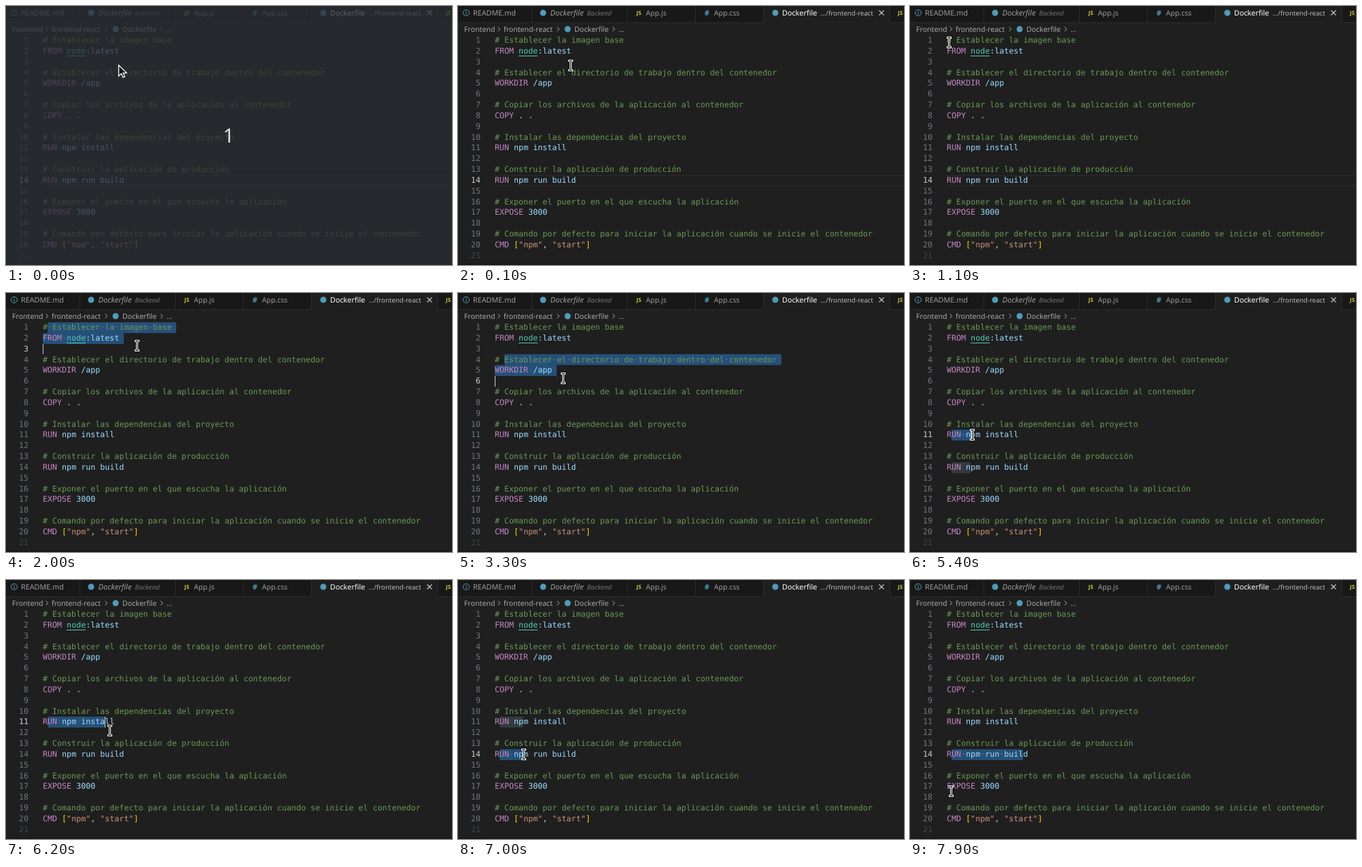
These frames come from a looping animation (655 by 381 pixels, 8 s). An HTML page with a canvas:

```html
<!DOCTYPE html>
<html lang="es">
<head>
<meta charset="utf-8">
<title>Dockerfile</title>
<style>
html, body { margin: 0; width: 100%; height: 100%; overflow: hidden; background: #1f1f1f; }
canvas { display: block; width: 655px; height: 381px; }
</style>
</head>
<body>
<canvas id="stage" width="655" height="381"></canvas>
<script>
const ctx = document.getElementById('stage').getContext('2d');
const W = 655, H = 381, LOOP = 8000, STEP = 100;
// Editor metrics at 5/6 zoom
const LEFT = 54, TOP = 42.9, CHAR = 7.024, ROW = 19 * 5 / 6;
const MONO = '11.667px "DejaVu Sans Mono", monospace';
const UI = '"Noto Sans", sans-serif';
const BLUE = '#519aba', YELLOW = '#cbcb41', DIM = '#9d9d9d';

const lines = `# Establecer la imagen base
FROM node:latest

# Establecer el directorio de trabajo dentro del contenedor
WORKDIR /app

# Copiar los archivos de la aplicación al contenedor
COPY . .

# Instalar las dependencias del proyecto
RUN npm install

# Construir la aplicación de producción
RUN npm run build

# Exponer el puerto en el que escucha la aplicación
EXPOSE 3000

# Comando por defecto para iniciar la aplicación cuando se inicie el contenedor
CMD ["npm", "start"]
`.split('\n');

// Pointer path: time, x, y
const path = [
  [400, 166, 88], [900, 54, 56], [1100, 58, 54], [1300, 58, 54], [1400, 61, 53],
  [1500, 76, 53], [1600, 100, 55], [1800, 175, 68], [2000, 193, 78], [2200, 150, 86],
  [2500, 68, 97], [2900, 140, 103], [3100, 152, 117], [3300, 155, 126], [3800, 54, 156],
  [3900, 55, 151], [4000, 55, 151], [4100, 62, 148], [4200, 90, 155], [4300, 117, 159],
  [4800, 62, 207], [5000, 62, 207], [5100, 63, 208], [5900, 139, 211], [6000, 146, 214],
  [6200, 153, 222], [6800, 61, 256], [6900, 62, 256], [7200, 166, 258], [7700, 89, 309],
  [7800, 72, 311], [7900, 61, 311]
];

// Mouse drags: press time, release time, anchor row and column
const drags = [
  { down: 1400, up: 2000, row: 0, col: 1 },
  { down: 2500, up: 3300, row: 3, col: 2 },
  { down: 4100, up: 4300, row: 6, col: 0 },
  { down: 5100, up: 6000, row: 10, col: 1 },
  { down: 6900, up: 7200, row: 13, col: 1 }
];

const colX = c => LEFT + c * CHAR;
const rowY = r => Math.round(TOP + r * ROW);
const baseline = r => Math.round(TOP + r * ROW + 11.2);

function pointer(t) {
  const i = path.findIndex(k => k[0] > t);
  if (i === 0) return path[0].slice(1);
  if (i < 0) return path[path.length - 1].slice(1);
  const [t0, x0, y0] = path[i - 1], [t1, x1, y1] = path[i];
  const p = (t - t0) / (t1 - t0);
  return [x0 + (x1 - x0) * p, y0 + (y1 - y0) * p];
}

function selection(t) {
  const drag = drags.filter(d => d.down <= t).pop();
  if (!drag) return null;
  const [x, y] = pointer(Math.min(t, drag.up));
  const row = Math.floor((y - TOP) / ROW);
  const col = Math.max(0, Math.min(lines[row].length, Math.round((x - LEFT) / CHAR)));
  return { r0: drag.row, c0: drag.col, r1: row, c1: col, caret: t < drag.up + 500 };
}

function text(str, x, y, color, font, align = 'left') {
  ctx.font = font;
  ctx.fillStyle = color;
  ctx.textAlign = align;
  ctx.fillText(str, x, y);
}

function rect(x, y, w, h, color) {
  ctx.fillStyle = color;
  ctx.fillRect(x, y, w, h);
}

function stroke(points, color, width) {
  ctx.beginPath();
  points.forEach(([x, y], i) => i ? ctx.lineTo(x, y) : ctx.moveTo(x, y));
  ctx.strokeStyle = color;
  ctx.lineWidth = width;
  ctx.stroke();
}

function dot(x, y) {
  ctx.beginPath();
  ctx.arc(x, y, 4.5, 0, 7);
  ctx.fillStyle = BLUE;
  ctx.fill();
}

function mark(row, from, to, color) {
  const x = Math.floor(colX(from)), y = rowY(row);
  ctx.beginPath();
  ctx.roundRect(x, y, Math.floor(colX(to)) - x, rowY(row + 1) - y, 2);
  ctx.fillStyle = color;
  ctx.fill();
}

function drawTabs() {
  rect(0, 0, W, 25, '#181818');
  rect(0, 24, W, 1, '#2b2b2b');
  rect(449, 0, 185, 25, '#1f1f1f');
  for (const x of [108, 248, 348, 448, 634]) rect(x, 0, 1, 25, '#2b2b2b');

  ctx.beginPath();
  ctx.arc(12, 10, 4.5, 0, 7);
  ctx.strokeStyle = BLUE;
  ctx.lineWidth = 1;
  ctx.stroke();
  rect(11.5, 7.3, 1.1, 1.2, BLUE);
  rect(11.5, 9.3, 1.1, 3.4, BLUE);
  text('README.md', 22, 14, DIM, '10.8px ' + UI);

  dot(125, 10);
  text('Dockerfile', 135.5, 14, DIM, 'italic 11.2px ' + UI);
  text('Backend', 189.5, 14, '#747474', 'italic 9.6px ' + UI);

  for (const x of [262, 646]) text('JS', x, 13, YELLOW, 'bold 8px ' + UI);
  text('App.js', 276, 14, DIM, '10.5px ' + UI);

  text('#', 362, 14, BLUE, 'bold 11px ' + UI);
  text('App.css', 376, 14, DIM, '10.5px ' + UI);

  dot(466, 10);
  text('Dockerfile', 476, 14, '#ffffff', '10.8px ' + UI);
  text('.../frontend-react', 532.5, 14, '#b9b9b9', '9.7px ' + UI);
  stroke([[618.5, 6.5], [625.5, 13.5]], '#cccccc', 1.1);
  stroke([[618.5, 13.5], [625.5, 6.5]], '#cccccc', 1.1);
}

function drawBreadcrumbs() {
  const font = '10.6px ' + UI;
  text('Frontend', 9, 38, '#a9a9a9', font);
  text('frontend-react', 67, 38, '#a9a9a9', font);
  dot(161, 34);
  text('Dockerfile', 171, 38, '#a9a9a9', font);
  text('…', 236, 38, '#a9a9a9', font);
  for (const x of [58.5, 145.5, 227]) {
    stroke([[x, 30.8], [x + 3.2, 34], [x, 37.2]], '#a9a9a9', 1);
  }
}

function drawSelection(sel) {
  const { r0, c0, r1, c1 } = sel;
  if (r0 === r1) {
    const [a, b] = [Math.min(c0, c1), Math.max(c0, c1)];
    const needle = lines[r0].slice(a, b).toLowerCase();
    if (needle.trim()) {
      lines.forEach((line, r) => {
        const low = line.toLowerCase();
        for (let i = low.indexOf(needle); i >= 0; i = low.indexOf(needle, i + needle.length)) {
          if (r !== r0 || i !== a) mark(r, i, i + needle.length, 'rgba(173,214,255,0.15)');
        }
      });
    }
  }
  for (let r = r0; r <= r1; r++) {
    const from = r === r0 ? c0 : 0;
    const to = r === r1 ? c1 : lines[r].length + 1;
    if (to <= from) continue;
    mark(r, from, to, '#264f78');
    for (let c = from; c < to; c++) {
      if (lines[r][c] === ' ') text('·', colX(c), baseline(r), 'rgba(227,228,226,0.3)', MONO);
    }
  }
}

function tokenColor(tok, start) {
  if (start === 0) return '#c586c0';
  if (tok[0] === '"') return '#ce9178';
  if (tok === '[' || tok === ']') return '#ffd700';
  if (tok === 'node') return '#4ec9b0';
  return tok === ',' || tok === '.' ? '#cccccc' : '#9cdcfe';
}

function drawCode(active) {
  lines.forEach((line, r) => {
    const y = baseline(r);
    const last = r === lines.length - 1;
    const numColor = r === active ? '#cccccc' : last ? '#414549' : '#6e7681';
    text(r + 1, 33, y, numColor, MONO, 'right');
    const comment = line[0] === '#';
    const tokens = line.matchAll(comment ? /\S+/g : /"\w+"|[[\]]|node|[^\s"[\]]+/g);
    for (const { 0: tok, index } of tokens) {
      text(tok, colX(index), y, comment ? '#6a9955' : tokenColor(tok, index), MONO);
      if (tok === 'node') rect(Math.round(colX(index)), y + 3, 4 * CHAR, 1, '#4ec9b0');
    }
  });
}

function drawBeam(px, py) {
  const x = Math.round(px) - 0.5, y = Math.round(py) - 0.5;
  const parts = [
    [[x - 2, y - 7], [x + 2, y - 7]],
    [[x, y - 7], [x, y + 7]],
    [[x - 2, y + 7], [x + 2, y + 7]]
  ];
  ctx.lineCap = 'square';
  for (const p of parts) stroke(p, '#ffffff', 3);
  for (const p of parts) stroke(p, '#111111', 1);
  ctx.lineCap = 'butt';
}

function drawArrow(x, y) {
  const pts = [[0, 0], [0, 16], [3.8, 12.6], [6.4, 18.2], [9, 17], [6.5, 11.6], [11.5, 11.4]];
  ctx.beginPath();
  for (const [dx, dy] of pts) ctx.lineTo(x + dx, y + dy);
  ctx.closePath();
  ctx.fillStyle = '#16181b';
  ctx.fill();
  ctx.strokeStyle = '#ffffff';
  ctx.lineWidth = 1.3;
  ctx.stroke();
}

function draw(t) {
  const sel = selection(t);
  const active = sel ? sel.r1 : 13;
  rect(0, 0, W, H, '#1f1f1f');
  drawTabs();
  drawBreadcrumbs();
  if (!sel || (sel.r0 === sel.r1 && sel.c0 === sel.c1)) {
    rect(LEFT, rowY(active), W, 1, '#2c2c2c');
    rect(LEFT, rowY(active + 1) - 1, W, 1, '#2c2c2c');
  }
  if (sel) drawSelection(sel);
  drawCode(active);
  if (sel && sel.caret) {
    const y = rowY(sel.r1);
    rect(Math.floor(colX(sel.c1)), y, 1, rowY(sel.r1 + 1) - y, '#cccccc');
  }
  rect(0, 379, W, 2, '#181818');

  if (t < 100) {
    rect(0, 0, W, H, 'rgba(41,45,51,0.77)');
    text('1', 327, 201, '#dcdddf', '29px ' + UI, 'center');
    drawArrow(165.5, 87);
  } else {
    drawBeam(...pointer(t));
  }
}

ctx.textRendering = 'geometricPrecision';
const start = performance.now();
function tick() {
  const t = (performance.now() - start) % LOOP;
  draw(Math.floor(t / STEP) * STEP);
  requestAnimationFrame(tick);
}
tick();
</script>
</body>
</html>
```
